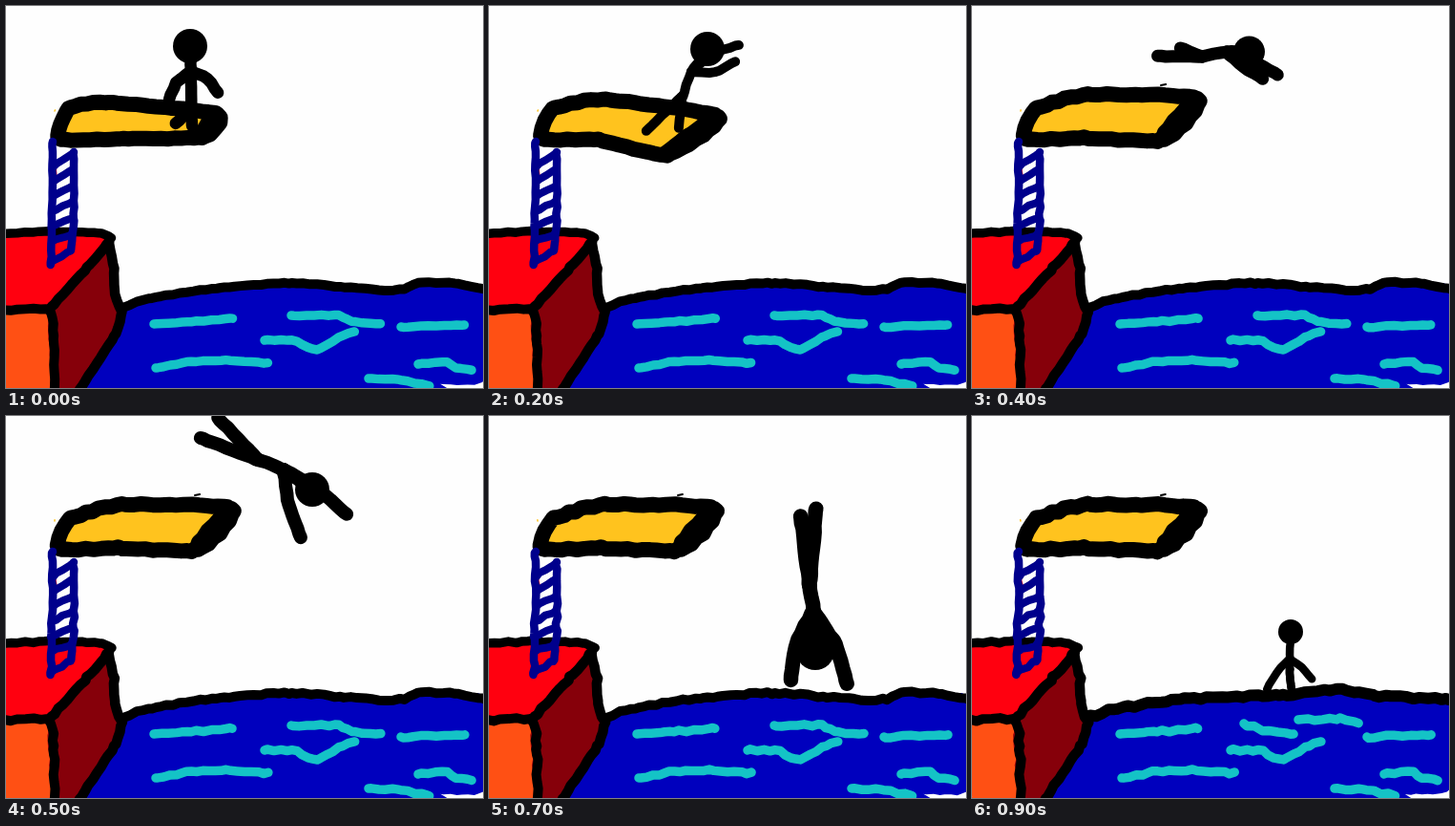
An HTML page with a canvas for the animation above (1 s loop, 500 px wide and 400 px high).

```html
<!DOCTYPE html>
<html lang="en">
<head>
<meta charset="utf-8">
<title>High dive</title>
<style>
html, body { margin: 0; width: 100%; height: 100%; overflow: hidden; background: #fefefe; }
canvas { display: block; width: 500px; height: 400px; }
</style>
</head>
<body>
<canvas id="stage" width="500" height="400"></canvas>
<script>
const ctx = document.getElementById('stage').getContext('2d');
const STEP = 100, COUNT = 10;
const BLACK = '#000', BLUE = '#0000be', CYAN = '#14c3c6', NAVY = '#00008c',
      RED = '#ff000f', MAROON = '#86000a', ORANGE = '#ff5014', YELLOW = '#ffc31e';
let rough = 0.5;

ctx.lineCap = ctx.lineJoin = 'round';

const parse = s => s.split(' ').map(p => p.split(',').map(Number));
const toPoints = p => typeof p === 'string' ? parse(p) : p;
const mix = (a, b, t) => a + (b - a) * t;
const mixPoints = (a, b) => a.map(([x, y], i) => [mix(x, b[i][0], 0.5), mix(y, b[i][1], 0.5)]);

// Softly rounded curve through the points, with a seeded hand wobble
function trace(shape, close) {
  const pts = toPoints(shape), n = pts.length;
  const at = i => close ? pts[(i + n) % n] : pts[Math.min(n - 1, Math.max(0, i))];
  let seed = Math.floor(pts[0][0] * 31 + pts[0][1] * 17 + n * 101) + 7;
  const wobble = () => {
    seed = seed * 16807 % 2147483647;
    return (seed / 2147483647 * 2 - 1) * rough;
  };
  ctx.beginPath();
  ctx.moveTo(...pts[0]);
  for (let i = 0; i < (close ? n : n - 1); i++) {
    const [o, a, b, c] = [at(i - 1), at(i), at(i + 1), at(i + 2)];
    const steps = Math.max(1, Math.round(Math.hypot(b[0] - a[0], b[1] - a[1]) / 6));
    for (let k = 1; k <= steps; k++) {
      const t = k / steps, u = 1 - t, ease = t * t * (3 - 2 * t);
      const spot = d => mix(a[d], b[d], ease) +
        0.28 * t * u * (u * (b[d] - o[d]) - t * (c[d] - a[d]));
      ctx.lineTo(spot(0) + wobble(), spot(1) + wobble());
    }
  }
  if (close) ctx.closePath();
}

function line(shape, width, color = BLACK, close = false) {
  trace(shape, close);
  ctx.lineWidth = width;
  ctx.strokeStyle = color;
  ctx.stroke();
}

function fill(shape, color) {
  trace(shape, true);
  ctx.fillStyle = color;
  ctx.fill();
}

// Sea
const CALM = '122,316 150,306 225,295 300,290 350,294 400,298 418,296 432,290 470,290 503,297';
const SETTLED = '122,316 150,307 215,297 330,292 388,286 420,293 503,297';
const SPLASH = '250,288 253,264 259,247 277,250 302,271 322,243 345,232 364,243 372,271 397,258 427,253 445,258 447,286';
const RIPPLES = [ // shape, first step, last step
  ['155,333 190,331 238,327', 0, 9],
  ['414,336 480,334', 0, 9],
  ['157,379 190,373 230,371 274,374', 0, 9],
  ['432,375 462,373 472,379 488,381', 0, 9],
  ['380,390 410,391 444,398', 0, 9],
  ['271,350 300,350 326,360 352,345 365,341', 0, 9],
  ['299,324 348,324 362,330 392,333', 0, 7],
  ['285,322 310,330 337,333', 9, 9],
  ['342,318 385,317 405,321', 9, 9]
];

function drawSea(i) {
  const top = i === 9 ? SETTLED : CALM;
  fill(top + ' 503,389 478,397 455,396 446,405 75,405', BLUE);
  line(top, i === 9 ? 12 : 10);
  if (i === 8) {
    line(SPLASH, 16.5);
    fill(SPLASH + ' 441,306 255,306', BLUE);
    line(SPLASH, 14);
  }
  for (const [shape, from, to] of RIPPLES) {
    if (i >= from && i <= to) line(shape, 9.5, CYAN);
  }
}

// Block and ladder
function drawTower() {
  fill('-4,238 108,240 46,318 -4,320', RED);
  fill('0,320 46,320 51,405 1,405', ORANGE);
  fill('108,246 112,300 121,320 74,405 52,405 46,320', MAROON);
  line('-4,239 40,236 100,238 110,243', 9.5);
  line('108,245 113,275 114,302 121,320 115,343 76,404', 10.5);
  line('108,247 85,274 46,317', 10.5);
  line('-4,319 45,318 50,345 51,405', 10);

  line('51,166 51,186', 5, RED);
  line('49,142 48,235 47,271', 8.5, NAVY);
  line('71,153 71,225 68,255', 8.5, NAVY);
  for (let k = 0; k < 6; k++) {
    const y = 168 + 15.5 * k;
    line([[50, y], [70, y - 14 + 1.5 * k]], 8, NAVY);
  }
  line('48,268 68,256', 8, NAVY);
}

// Board: back low, back high, top, tip, front low, underside
const REST = parse('56,139 66,107 105,101 222,113 208,137 120,139');
const BENT = parse('56,139 66,108 120,98 241,116 187,156 115,140');
const RAISED = parse('56,139 66,108 122,93 237,97 202,140 118,138');
const DIP = mixPoints(REST, BENT);

function drawBoard(i) {
  const edge = [REST, DIP, BENT][i] || RAISED;
  fill(edge, YELLOW);
  line(edge, 16, BLACK, true);
  line([edge[3], edge[4]].map(([x, y]) => [x - 5, y - 1]), 15);
  line('51,110 52,109', 1.5, YELLOW);
  if (i > 3) line('198,83 204,82', 2);
}

// Diver: head, neck, hip, two hands, two feet
const pose = (joints, width, head, bow) => ({ joints: toPoints(joints), width, head, bow });
const between = (a, b) => pose(mixPoints(a.joints, b.joints),
  ...['width', 'head', 'bow'].map(k => mix(a[k], b[k], 0.5)));

const stand = pose('193,42 194,68 194,107 171,98 222,91 178,123 195,125', 12.5, 18, 5);
const crouch = pose('229,45 212,69 203,94 262,41 258,58 165,131 199,128', 10, 18, -6);
const leap = pose('260,19 243,40 218,60 300,25 284,41 185,82 215,86', 12, 15, 0);
const tuck = pose('321,77 291,56 265,46 309,127 357,103 204,23 222,2', 14, 18, 4);
const plunge = pose('342,246 340,204 336,178 316,276 375,280 327,105 343,97', 15.5, 20, 6);
const enter = pose('343,236 337,193 335,172 313,228 382,225 322,130 347,130', 16, 15, 3);
const float = pose('334,226 333,254 333,265 309,286 356,275 335,286 335,286', 8.5, 13, 2);
const DIVE = [stand, between(stand, crouch), crouch, leap, between(leap, tuck), tuck,
              between(tuck, plunge), plunge, enter, float];

function limb(a, b, bow, width) {
  const dx = b[0] - a[0], dy = b[1] - a[1], k = bow / Math.hypot(dx, dy);
  line([a, [mix(a[0], b[0], 0.5) - dy * k, mix(a[1], b[1], 0.5) + dx * k], b], width);
}

function drawDiver({ joints, width, head, bow }) {
  const [skull, neck, hip, handA, handB, footA, footB] = joints;
  line([skull, neck, hip], width);
  limb(neck, handA, bow, width);
  limb(neck, handB, -bow, width);
  line([hip, footA], width);
  line([hip, footB], width);
  ctx.beginPath();
  ctx.arc(...skull, head, 0, 7);
  ctx.fillStyle = BLACK;
  ctx.fill();
}

function draw(i) {
  ctx.fillStyle = '#fefefe';
  ctx.fillRect(0, 0, 500, 400);
  rough = 0.5 + i * 0.1;
  drawBoard(i);
  rough = 0.5;
  drawDiver(DIVE[i]);
  rough = 0.5 + i * 0.1;
  drawSea(i);
  drawTower();
}

let shown = -1;
const start = performance.now();
function tick(now) {
  const i = Math.floor(Math.max(0, now - start) / STEP) % COUNT;
  if (i !== shown) draw(shown = i);
  requestAnimationFrame(tick);
}
tick(start);
</script>
</body>
</html>
```
